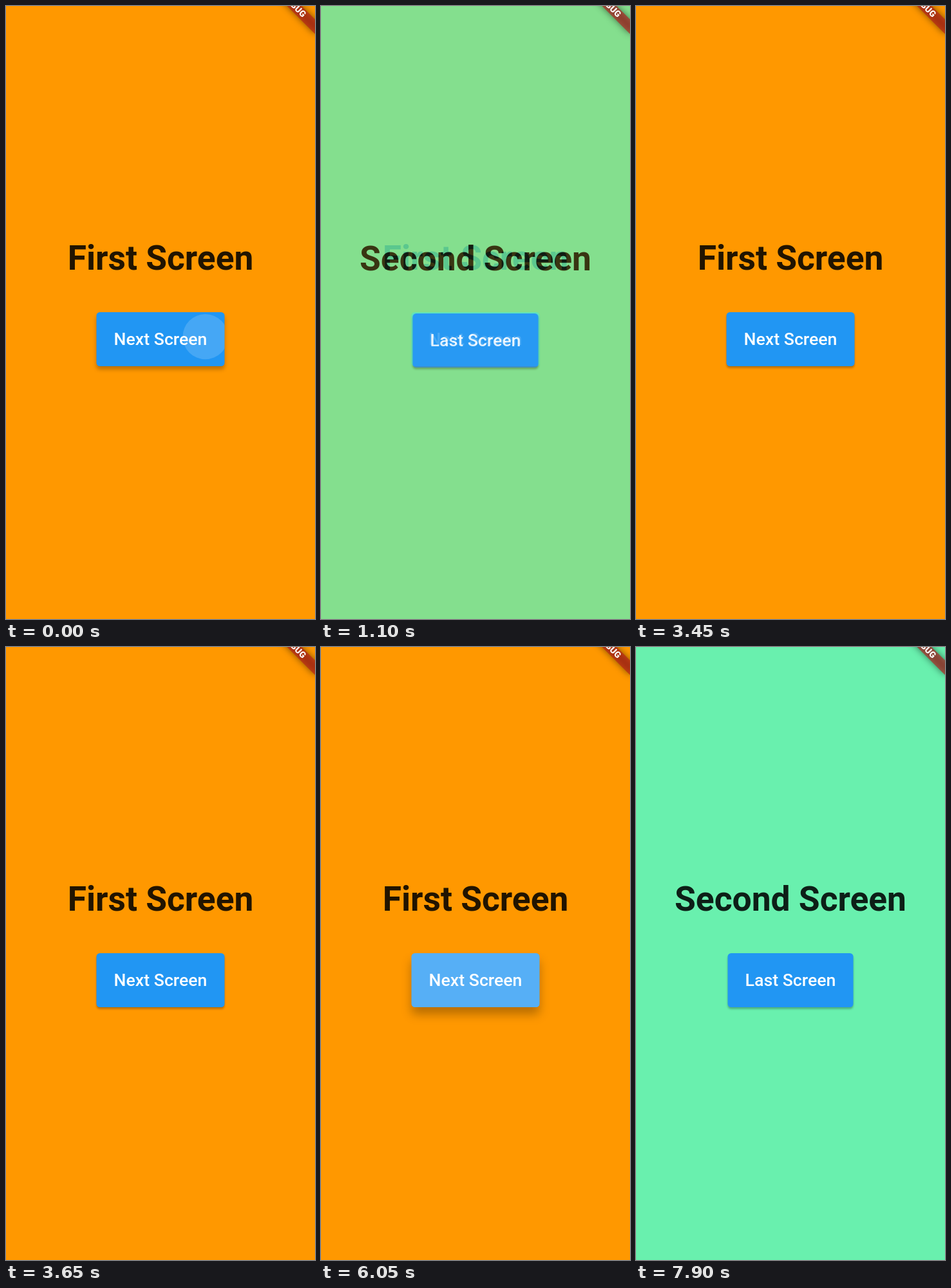
Write an HTML page with a canvas that moves like this. It is 480x953 px and loops after 8 s.

```html
<!DOCTYPE html>
<html lang="en">
<head>
<meta charset="utf-8">
<title>Screen navigation</title>
<style>
  html, body { margin: 0; width: 100%; height: 100%; overflow: hidden; }
  canvas { display: block; }
</style>
</head>
<body>
<canvas id="stage" width="480" height="953"></canvas>
<script>
const W = 480, H = 953, LOOP = 8000, STEP = 50;
const DP = 4 / 3;            // pixels per logical unit
const TOP = -24 * DP;        // the page begins above the visible area
const RISE = 246.7;          // distance an entering page travels

const stage = document.getElementById('stage').getContext('2d');
const layerCanvas = Object.assign(document.createElement('canvas'), { width: W, height: H });
const layer = layerCanvas.getContext('2d');

const first = {
  color: '#ff9800', title: 'First Screen', label: 'Next Screen', x: 140.5, w: 199,
  presses: [{ down: -50, up: 835, x: 312, y: 514 }, { down: 5150, up: 6685, x: 312, y: 514 }]
};
const second = {
  color: '#69f0ae', title: 'Second Screen', label: 'Last Screen', x: 142.5, w: 195,
  presses: [{ down: 2080, up: 2950, x: 315, y: 514 }]
};
const BUTTON_Y = 476, BUTTON_H = 84;
const PUSH = 835, POP = 2950, PUSH_AGAIN = 6685, TRANSITION = 300;

const clamp = v => Math.min(1, Math.max(0, v));
const mix = (a, b, k) => a + (b - a) * k;

function cubic(x1, y1, x2, y2) {
  const at = (a, b, s) => 3 * (1 - s) ** 2 * s * a + 3 * (1 - s) * s * s * b + s ** 3;
  return x => {
    if (x <= 0 || x >= 1) return clamp(x);
    let lo = 0, hi = 1;
    for (let i = 0; i < 30; i++) {
      const mid = (lo + hi) / 2;
      if (at(x1, x2, mid) < x) lo = mid; else hi = mid;
    }
    return at(y1, y2, lo);
  };
}
const ease = cubic(0.25, 0.1, 0.25, 1);
const easeIn = cubic(0.42, 0, 1, 1);
const fastOutSlowIn = cubic(0.4, 0, 0.2, 1);

function text(c, str, x, y, weight, size, color) {
  c.font = `${weight} ${size}px Roboto, sans-serif`;
  c.textAlign = 'center';
  c.fillStyle = color;
  c.fillText(str, x, y);
}

function buttonPath(c, page, dy = 0) {
  c.beginPath();
  c.roundRect(page.x, BUTTON_Y + dy, page.w, BUTTON_H, 4 * DP);
}

function shadow(c, page, elevation) {
  c.save();
  c.filter = `blur(${0.9 * elevation}px)`;
  c.fillStyle = 'rgba(0,0,0,0.27)';
  buttonPath(c, page, 1.4 * elevation);
  c.fill();
  c.restore();
}

function ripple(c, page, press, t) {
  const held = Math.min(t, press.up) - press.down;
  const since = Math.max(0, t - press.up);
  const k = ease(clamp(held / 1000 + since / 225));
  const half = Math.hypot(page.w, BUTTON_H) / 2;
  const alpha = 0.24 * clamp((t - press.down) / 75) * (1 - clamp((since - 225) / 150));
  c.save();
  buttonPath(c, page);
  c.clip();
  c.fillStyle = `rgba(255,255,255,${alpha})`;
  c.beginPath();
  c.arc(mix(press.x, W / 2, k), mix(press.y, BUTTON_Y + BUTTON_H / 2, k),
        mix(half * 0.3, half + 5 * DP, k), 0, 2 * Math.PI);
  c.fill();
  c.restore();
}

function drawPage(c, page, t) {
  const press = page.presses.find(p => t >= p.down && t < p.up + 375);
  let lift = 0;
  if (press) {
    lift = t < press.up ? fastOutSlowIn(clamp((t - press.down) / 200))
                        : 1 - fastOutSlowIn(clamp((t - press.up) / 200));
  }
  c.fillStyle = page.color;
  c.fillRect(0, TOP, W, H - TOP);
  text(c, page.title, W / 2, 409.5, 700, 40 * DP, 'rgba(0,0,0,0.87)');
  shadow(c, page, 2 + 6 * lift);
  c.fillStyle = '#2196f3';
  buttonPath(c, page);
  c.fill();
  if (press) ripple(c, page, press, t);
  text(c, page.label, W / 2, 527.4, 500, 20 * DP, '#fff');
}

function drawBanner(c) {
  c.save();
  c.translate(W, TOP);
  c.rotate(Math.PI / 4);
  c.scale(DP, DP);
  c.filter = 'blur(5.3px)';
  c.fillStyle = 'rgba(0,0,0,0.5)';
  c.fillRect(-40, 28, 80, 12);
  c.filter = 'none';
  c.fillStyle = 'rgba(183,28,28,0.627)';
  c.fillRect(-40, 28, 80, 12);
  text(c, 'DEBUG', 0, 37, 900, 10.2, '#fff');
  c.restore();
}

function pageProgress(t) {
  const since = start => clamp((t - start) / TRANSITION);
  if (t < POP) return since(PUSH);
  return t < PUSH_AGAIN ? 1 - since(POP) : since(PUSH_AGAIN);
}

function render(t) {
  const k = pageProgress(t);
  if (k < 1) drawPage(stage, first, t);
  if (k > 0) {
    layer.clearRect(0, 0, W, H);
    layer.save();
    layer.translate(0, RISE * (1 - fastOutSlowIn(k)));
    drawPage(layer, second, t);
    layer.restore();
    stage.globalAlpha = easeIn(k);
    stage.drawImage(layerCanvas, 0, 0);
    stage.globalAlpha = 1;
  }
  drawBanner(stage);
}

const begin = performance.now();
function tick() {
  const t = (performance.now() - begin) % LOOP;
  render(Math.floor(t / STEP) * STEP);
  requestAnimationFrame(tick);
}
tick();
</script>
</body>
</html>
```
